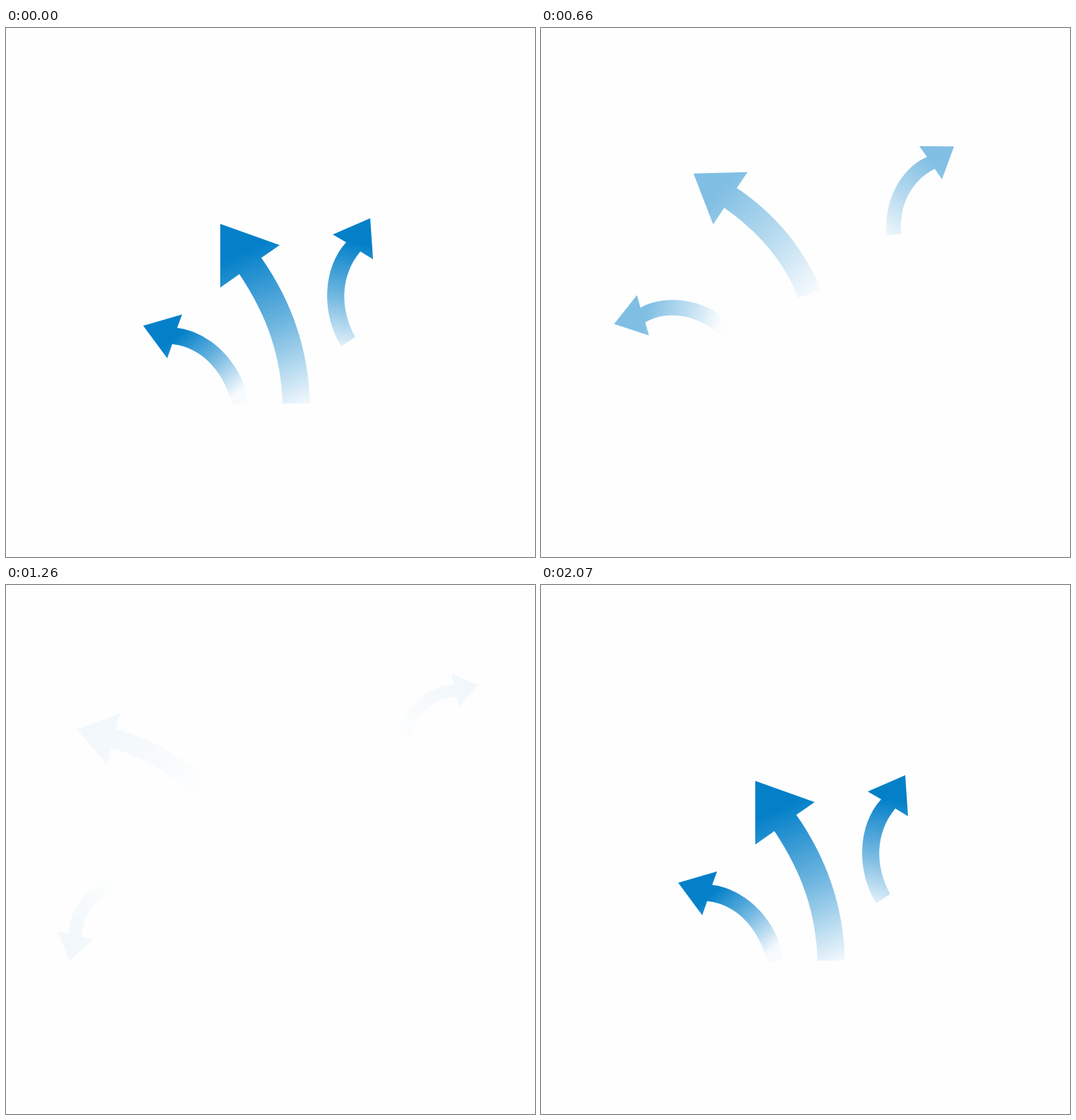
Recreate the animation shown at these times as an HTML page with a canvas. Size 748 by 748 pixels, loop 2.7 s.

```html
<!DOCTYPE html>
<html lang="en">
<head>
<meta charset="utf-8">
<title>Arrows</title>
<style>
  html, body { margin: 0; height: 100%; overflow: hidden; background: #fefefe; }
  canvas { display: block; }
</style>
</head>
<body>
<canvas id="stage" width="748" height="748"></canvas>
<script>
const ctx = document.getElementById('stage').getContext('2d');
const STEP = 30, LOOP = 2700;
const EXIT = 42;               // steps to fly out and fade
const ENTER = 62, ENTER_FOR = 7;

const mix = (a, b, u) => a + (b - a) * u;

// Point on the Bezier curve with any number of control points
function bezier(points, u) {
  while (points.length > 1)
    points = points.slice(1).map((q, i) => q.map((v, k) => mix(points[i][k], v, u)));
  return points[0];
}

// path: control points of the centre; turn, size, alpha: start and end values
const move = (start, steps, path, turn, size, alpha) => ({ start, steps, path, turn, size, alpha });
const enter = (from, home, turn, size, alpha) =>
  move(ENTER, ENTER_FOR, [from, home], [turn, 0], [size, 1], [alpha, 1]);

function makeArrow(shape, fade, home, moves) {
  const fill = ctx.createLinearGradient(...fade);
  ['#0480c9', '#75b9e1', '#f8fbfe'].forEach((color, i) => fill.addColorStop(i / 2, color));
  return { path: new Path2D(shape), fill, home, moves };
}

const left = [263, 476], middle = [357, 404], right = [499.5, 356];
const arrows = [
  makeArrow(
    'M194 421L249 405L242 424C290 430 335 475 343 529L320 534C310 490 280 452 235 447L228 467Z',
    [250, 430, 326, 518], left, [
      move(0, 28, [left, [233, 453], [215, 406], [145, 429]], [0, -45], [1, .885], [1, .37]),
      move(28, 14, [[145, 429], [128, 472.5]], [-45, -95.5], [.885, .795], [.37, .05]),
      enter([225, 520], left, 69, .943, .13)
    ]),
  makeArrow(
    'M303 277L387 307L361 325C404 386 428 455 430 531L391 531C389 465 370 408 330 348L303 367Z',
    [330, 320, 425, 537], middle, [
      move(0, EXIT, [middle, [344.5, 342], [279, 228], [190.5, 249.5]], [0, -40.3], [1, .728], [1, .05]),
      enter([340, 430], middle, 35, .925, 0)
    ]),
  makeArrow(
    'M515 269L519 327L501 316C471 352 473 400 494 437L474 450C446 405 447 340 481 303L462 292Z',
    [497, 305, 471, 463], right, [
      move(0, EXIT, [right, [475, 270], [587, 178], [615.5, 176.5]], [0, 46], [1, .715], [1, .05]),
      enter([512, 385], right, -77, .925, 0)
    ])
];

function drawArrow({ path, fill, home, moves }, step) {
  const m = moves.filter(m => step >= m.start).pop();
  const u = Math.min((step - m.start) / m.steps, 1);
  const size = mix(...m.size, u);
  ctx.save();
  ctx.globalAlpha = mix(...m.alpha, u);
  ctx.translate(...bezier(m.path, u));
  ctx.rotate(mix(...m.turn, u) * Math.PI / 180);
  ctx.scale(size, size);
  ctx.translate(-home[0], -home[1]);
  ctx.fillStyle = fill;
  ctx.fill(path);
  ctx.restore();
}

const begin = performance.now();
function tick() {
  const step = Math.floor((performance.now() - begin) % LOOP / STEP);
  ctx.fillStyle = '#fefefe';
  ctx.fillRect(0, 0, 748, 748);
  arrows.forEach(arrow => drawArrow(arrow, step));
  requestAnimationFrame(tick);
}
tick();
</script>
</body>
</html>
```
